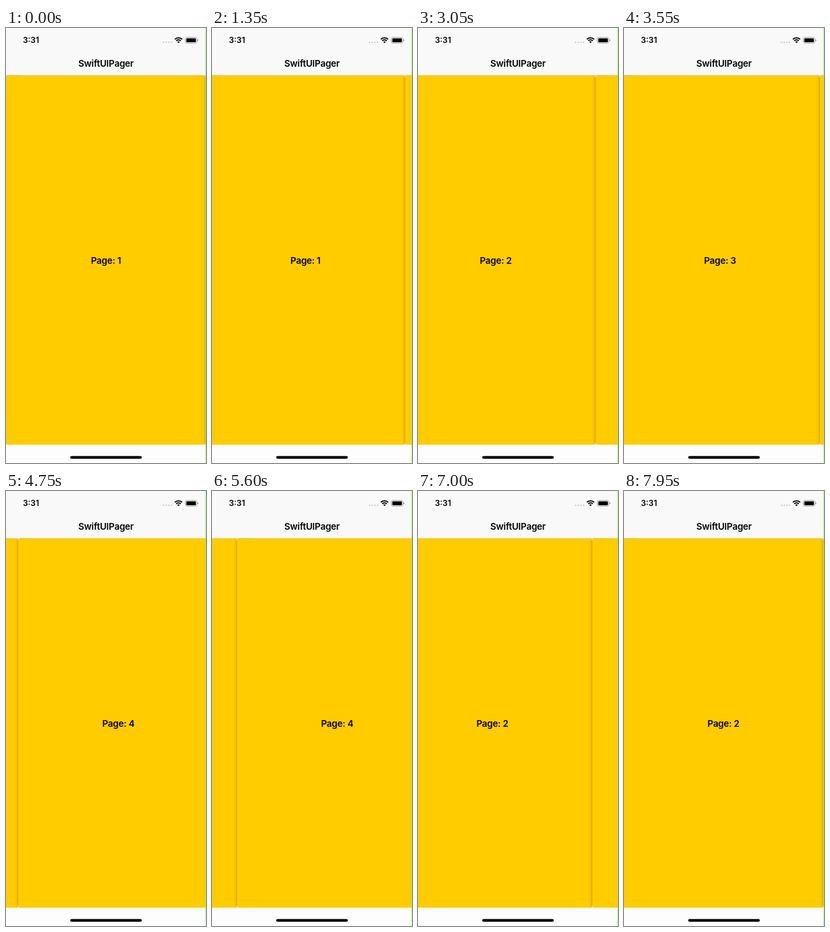
Recreate the animation shown at these times as an HTML page. Size 296 px wide and 640 px high, loop 8000 ms.

```html
<!DOCTYPE html>
<html lang="en">
<head>
<meta charset="utf-8">
<title>Pager</title>
<style>
  html, body { margin: 0; width: 100%; height: 100%; overflow: hidden; background: #fdfdfe; }
  svg { display: block; }
  text { font: 600 13.4px Inter, Roboto, sans-serif; letter-spacing: -.2px; text-anchor: middle; }
  text.clock { font-size: 11.9px; letter-spacing: 0; }
</style>
</head>
<body>
<svg id="stage" width="296" height="640" viewBox="0 0 296 640">
  <defs>
    <filter id="soft" x="-1" y="-.1" width="3" height="1.2">
      <feGaussianBlur stdDeviation="2.6"/>
    </filter>
  </defs>
  <rect width="296" height="640" fill="#fdfdfe"/>
  <g id="strip"></g>

  <rect width="296" height="69.4" fill="#f9f9f9"/>
  <rect y="69.4" width="296" height=".3" opacity=".3"/>
  <rect y="613.2" width="296" height="26.8" fill="#fdfdfe"/>

  <text class="clock" x="37" y="22.3">3:31</text>
  <text x="148" y="56.6">SwiftUIPager</text>

  <g fill="#c4c4c4">
    <circle cx="233.2" cy="21" r="1.1"/>
    <circle cx="237.2" cy="21" r="1.1"/>
    <circle cx="241.2" cy="21" r="1.1"/>
    <circle cx="245" cy="21" r="1.1"/>
  </g>
  <g fill="none" stroke="#000" stroke-width="1.8">
    <path d="M249.9 16.6a7.6 7.6 0 0 1 10.8 0"/>
    <path d="M251.9 18.8a4.8 4.8 0 0 1 6.8 0"/>
  </g>
  <path d="M253.5 20.4a2.5 2.5 0 0 1 3.6 0l-1.8 1.8z"/>
  <rect x="265.4" y="13.9" width="17" height="8.4" rx="2.3" fill="none" stroke="#8c8c8c" stroke-width=".8"/>
  <rect x="266.8" y="15.2" width="14.2" height="5.8" rx="1.2"/>
  <path d="M283.4 16.6q1.3 .4 1.3 1.5t-1.3 1.5z" fill="#8c8c8c"/>

  <rect x="95" y="629.8" width="106" height="4" rx="2"/>
  <rect x="294.7" width="1.3" height="640" fill="#80ff40" opacity=".5"/>
</svg>
<script>
  const WIDTH = 296, TOP = 69.4, HEIGHT = 543.8, LOOP = 8000, TICK = 50, PAGES = 6;
  const strip = document.getElementById('strip');

  function add(parent, tag, attrs, text) {
    const node = document.createElementNS('http://www.w3.org/2000/svg', tag);
    for (const key in attrs) node.setAttribute(key, attrs[key]);
    if (text) node.textContent = text;
    return parent.appendChild(node);
  }

  // Each rounded page casts a shadow on the one before it.
  for (let i = 0; i < PAGES; i++) {
    const page = add(strip, 'g', { transform: `translate(${i * WIDTH})` });
    const shape = { y: TOP, height: HEIGHT, rx: 3.9 };
    add(page, 'rect', { ...shape, width: 20, fill: '#6a3000', opacity: .5, filter: 'url(#soft)' });
    add(page, 'rect', { ...shape, width: WIDTH, fill: '#ffcc00' });
    add(page, 'text', { x: WIDTH / 2, y: 346.6 }, `Page: ${i + 1}`);
  }

  const swing = u => .5 - .5 * Math.cos(Math.PI * u);
  const drag = u => u * u;
  const settle = u => 1 - (1 - u) ** 4;

  // start, end, page offset reached, easing
  const moves = [
    [1250, 1800, .412, swing],
    [1850, 1900, .416, swing],
    [2000, 2250, 1, settle],
    [2800, 3200, 1.285, drag],
    [3200, 3450, 2, settle],
    [3450, 3550, 2.02, swing],
    [4300, 4550, 2.35, drag],
    [4550, 5000, 3, settle],
    [5450, 5700, 2.65, drag],
    [5700, 6150, 2, settle],
    [6550, 6850, 1.65, drag],
    [6850, 7300, 1, settle],
    [7850, 7950, 1.003, swing]
  ];

  function offsetAt(time) {
    let offset = 0;
    for (const [start, end, goal, ease] of moves) {
      if (time <= start) break;
      const u = Math.min(1, (time - start) / (end - start));
      offset += (goal - offset) * ease(u);
    }
    return offset;
  }

  function draw(now) {
    const time = Math.floor((now % LOOP) / TICK) * TICK;
    strip.setAttribute('transform', `translate(${-offsetAt(time) * WIDTH})`);
  }

  const begin = performance.now();
  function loop() {
    draw(performance.now() - begin);
    requestAnimationFrame(loop);
  }
  loop();
</script>
</body>
</html>
```
